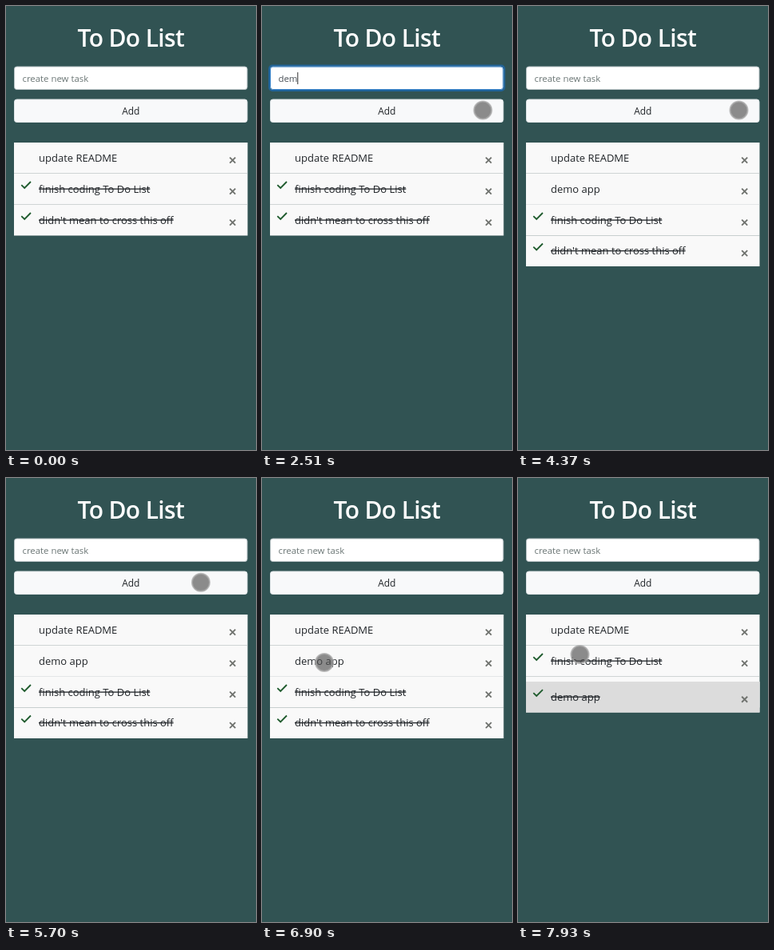
Write an HTML page that moves like this. It is 313 by 556 pixels and loops after 7990 ms.

```html
<!DOCTYPE html>
<html lang="en">
<head>
<meta charset="utf-8">
<title>To Do List</title>
<style>
  html, body { margin: 0; width: 100%; height: 100%; overflow: hidden; background: #315353; }
  svg { display: block; width: 100%; height: 100%; }
  text { font-family: "Open Sans", "Noto Sans", sans-serif; fill: #212529; white-space: pre; }
  .title { font-size: 30px; font-weight: 600; letter-spacing: -.65px; fill: #fff; }
  .field { font-size: 11.4px; fill: #495057; }
  .hint { font-size: 11.4px; fill: #6c7776; }
  .add { font-size: 12px; }
  .label { font-size: 13px; }
  .done .label { text-decoration: line-through; }
  .check { fill: none; stroke: #1d5a2c; stroke-width: 1.8; visibility: hidden; }
  .done .check { visibility: visible; }
  .cross { stroke: #70736f; stroke-width: 1.9; }
  .line { stroke: #cfd4d5; }
</style>
</head>
<body>
<svg viewBox="0 0 313 556">
  <rect width="313" height="556" fill="#315353"/>
  <text class="title" x="156.3" y="51" text-anchor="middle">To Do List</text>

  <rect x="10.5" y="76" width="291.5" height="28.5" rx="3" fill="#fff" stroke="#b9c3c6"/>
  <g id="focus" fill="none">
    <rect x="9" y="74.5" width="294.5" height="31.5" rx="4" stroke="#146ec8" stroke-opacity=".6" stroke-width="2"/>
    <rect x="10.5" y="76" width="291.5" height="28.5" rx="3" stroke="#3a86cf"/>
  </g>
  <text class="hint" id="hint" x="20.5" y="95">create new task</text>
  <text class="field" id="typed" x="20.5" y="95"></text>
  <rect id="caret" y="83" width="1" height="15" fill="#333"/>

  <rect x="10.5" y="117" width="291.5" height="28.5" rx="3" fill="#f8f9fa" stroke="#dfe5e7"/>
  <text class="add" x="156.3" y="135.6" text-anchor="middle">Add</text>

  <g id="list"></g>
  <circle id="cursor" r="11" fill="#505050" fill-opacity=".65" stroke="#aaa" stroke-opacity=".75" stroke-width="2"/>
</svg>
<script>
const LOOP = 7990;
const TASK = "demo app";
const KEY_TIMES = [2310, 2440, 2510, 2580, 2710, 2840, 2970, 3050];
const ADDED = 4300;
const TAPPED = 7090;
const $ = id => document.getElementById(id);
const list = $("list");

function addRow(label, done) {
  const row = document.createElementNS("http://www.w3.org/2000/svg", "g");
  row.innerHTML = `
    <rect x="10" y=".5" width="292.5" height="38.5" fill="#f9f9f9"/>
    <rect class="shade" x="10" y=".5" width="292.5" height="38.5" fill="#dcdcdc" opacity="0"/>
    <path class="check" d="M19.3 14.6l3.9 3.8 7.8-7.9"/>
    <text class="label" x="41" y="24.3">${label}</text>
    <path class="cross" d="M280.2 19.2l7 7m0-7l-7 7"/>`;
  row.classList.toggle("done", done);
  list.append(row);
  return row;
}

const readme = addRow("update README", false);
const finish = addRow("finish coding To Do List", true);
const undo = addRow("didn't mean to cross this off", true);
list.insertAdjacentHTML("beforeend", '<path class="line" d="M10 209.5h292.5M10 248.5h292.5"/>');
const demo = addRow(TASK, false);
const shade = demo.querySelector(".shade");

const clamp = u => Math.min(1, Math.max(0, u));
const smooth = u => u * u * (3 - 2 * u);
const out = u => 1 - (1 - u) ** 2;
const mix = (a, b, u) => a + (b - a) * u;
const span = (t, from, to) => clamp((t - from) / (to - from));
const stepped = (t, from, to, n) => Math.floor(span(t, from, to) * n + 1e-6) / n;
const within = (t, from, to) => t >= from && t < to;
const show = (el, on) => el.setAttribute("visibility", on ? "visible" : "hidden");
const place = (el, x, y) => el.setAttribute("transform", `translate(${x} ${y})`);

function bezier(p, u) {
  const v = 1 - u;
  return [0, 1].map(i => v ** 3 * p[0][i] + 3 * v * v * u * p[1][i] + 3 * v * u * u * p[2][i] + u ** 3 * p[3][i]);
}
const line = (a, b) => [a, a.map((c, i) => mix(c, b[i], 1 / 3)), a.map((c, i) => mix(c, b[i], 2 / 3)), b];

// Each move: start, end, number of steps, easing, curve
const moves = [
  [260, 1120, 13, smooth, [[280, 495], [233, 380], [233, 200], [280.5, 90.5]]],
  [1720, 1850, 2, u => u, line([280.5, 90.5], [276.5, 130.5])],
  [5633, 6430, 12, u => u, [[276.5, 130.5], [140, 132], [80, 130], [78.5, 208.5]]],
  [6430, 6900, 7, out, line([78.5, 208.5], [78, 231])],
  [7600, 7930, 5, smooth, line([78, 231], [77.5, 221])]
];

function drawCursor(t) {
  const [from, to, n, ease, curve] = moves.findLast(m => t >= m[0]) || moves[0];
  place($("cursor"), ...bezier(curve, ease(stepped(t, from, to, n))));
  show($("cursor"), t >= 260);
}

function drawInput(t) {
  const focus = stepped(t, 1383, 1650, 4) - stepped(t, 4113, 4370, 4);
  $("focus").setAttribute("opacity", focus);
  const count = t < ADDED ? KEY_TIMES.filter(k => t >= k).length : 0;
  $("typed").textContent = TASK.slice(0, count);
  show($("hint"), !count);
  show($("caret"), within(t, 1517, 2040) || within(t, 2310, 3580) || within(t, 4110, ADDED));
  $("caret").setAttribute("x", 20.3 + (count ? $("typed").getComputedTextLength() : 0));
}

function drawList(t) {
  const added = t >= ADDED;
  const tick = t < TAPPED ? t : TAPPED + Math.floor((t - TAPPED) / 64.6) * 64.6;
  const rise = smooth(span(tick, 7400, 7840));
  const fall = smooth(span(tick, 7400, 8360));
  place(readme, 0, 170.5);
  place(finish, 0, added ? mix(248.5, 209.5, rise) : 209.5);
  place(undo, 0, added ? mix(287, 248.5, rise) : 248.5);
  place(demo, 0, mix(209.5, 287.5, fall));
  show(demo, added);
  demo.classList.toggle("done", tick >= 7250);
  // Hidden rows must not leak their visible check mark
  demo.style.display = added ? "" : "none";
  shade.setAttribute("opacity", span(tick, 7030, 7250));
}

const start = performance.now();
function frame() {
  const t = (performance.now() - start) % LOOP;
  drawCursor(t);
  drawInput(t);
  drawList(t);
  requestAnimationFrame(frame);
}
frame();
</script>
</body>
</html>
```
